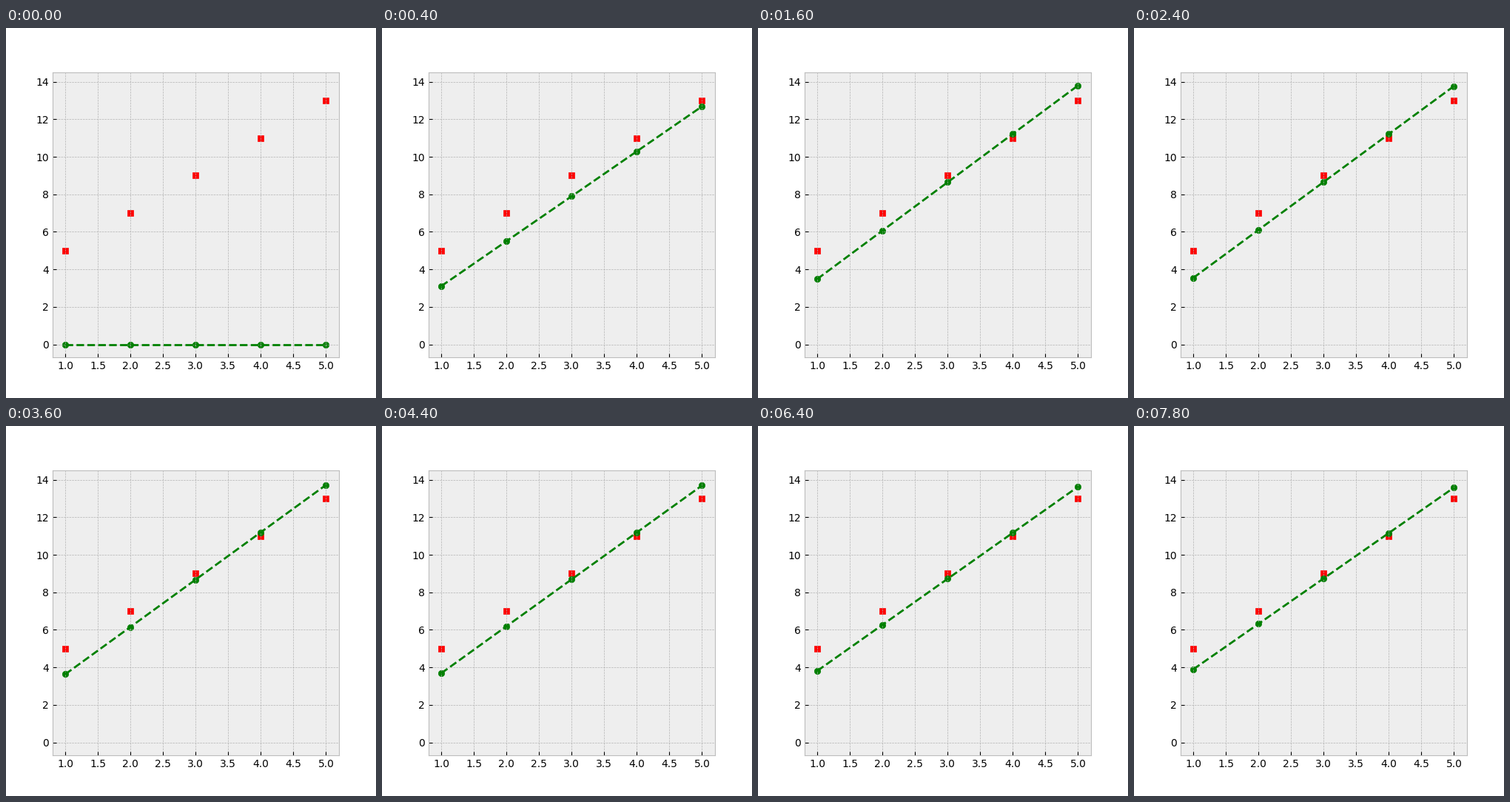
Animation of 500 by 500 pixels, one loop 8 s. Source, as a matplotlib script:

```python
import numpy as np
import matplotlib.pyplot as plt
from matplotlib.animation import ArtistAnimation

plt.style.use("bmh")

STEPS = 40
RATE = 0.06

x = np.arange(1, 6)
y = 2 * x + 3

fig, ax = plt.subplots(figsize=(5, 5), dpi=100)
ax.scatter(x, y, color="red", marker="s")

# Fit a line by gradient descent, one update per frame.
slope = bias = 0.0
frames = []
for _ in range(STEPS):
    guess = slope * x + bias
    dots = ax.scatter(x, guess, color="green")
    line, = ax.plot(x, guess, color="green", linestyle="--")
    frames.append([dots, line])
    error = guess - y
    slope -= RATE * np.mean(error * x)
    bias -= RATE * np.mean(error)

anim = ArtistAnimation(fig, frames, interval=200, repeat=True, repeat_delay=0)
plt.show()
```
